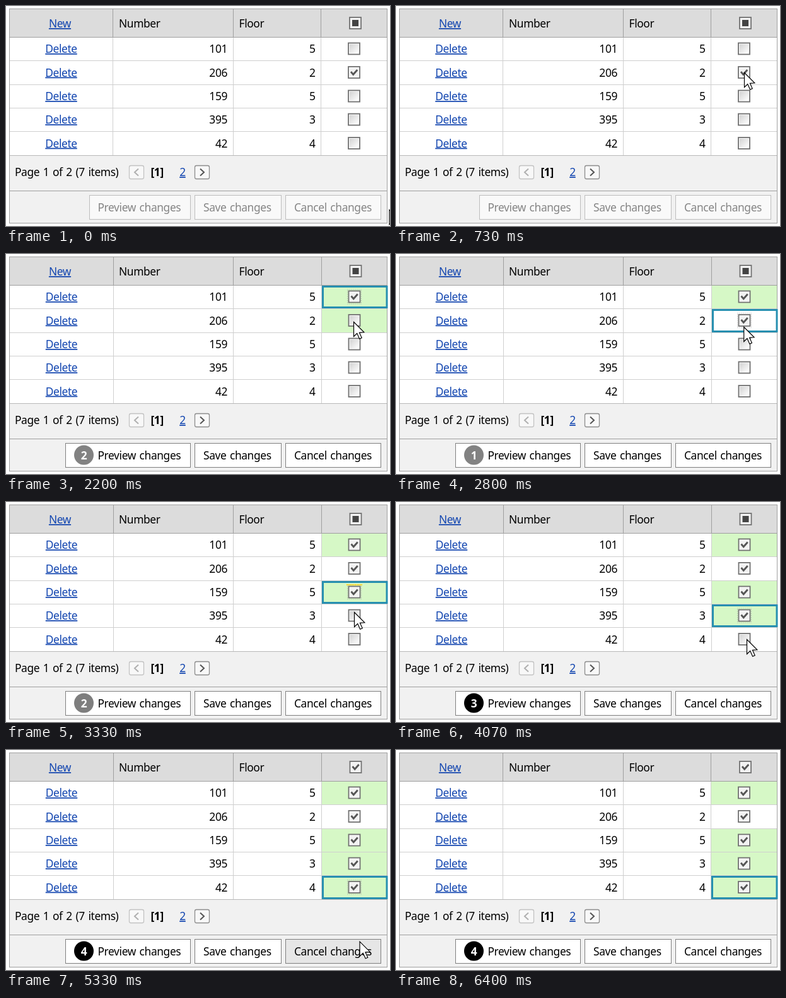
An HTML page that plays this animation: 609 px wide and 348 px high, repeating every 6.47 s.

```html
<!DOCTYPE html>
<html lang="en">
<head>
<meta charset="utf-8">
<title>Batch edit grid</title>
<style>
  html, body { margin: 0; width: 100%; height: 100%; overflow: hidden; background: #fff; }
  svg { display: block; }
  text {
    font: 17.4px "Noto Sans", "Open Sans", sans-serif;
    letter-spacing: -.4px;
    word-spacing: 1.5px;
    white-space: pre;
  }
  .bold { font-weight: 700; }
  .link { fill: #1346b0; text-decoration: underline; text-decoration-thickness: 1px; }
</style>
</head>
<body>
<svg id="stage" width="609" height="348" viewBox="0 0 609 348">
  <defs>
    <linearGradient id="shade" x2="1" y2="1">
      <stop stop-color="#d2d2d2"/>
      <stop offset="1" stop-color="#fff"/>
    </linearGradient>
  </defs>
  <g id="view"></g>
</svg>
<script>
const LOOP = 6470;
const rows = [[101, 5, 0], [206, 2, 1], [159, 5, 0], [395, 3, 0], [42, 4, 0]];
const edges = [50, 87, 125, 162, 199, 237];
const centers = [67.5, 105, 142.5, 179.5, 217];

// time, row toggled, time the badge starts to fade in
const clicks = [
  [1000, 1, 1190], [1870, 0, 2070], [2470, 1, 2670],
  [3000, 2, 3195], [3600, 3, 3795], [4270, 4, 4465]
];
const FADE = 270;

// time, x, y of the pointer tip
const path = [
  [0, 607.5, 322], [670, 552, 106], [730, 552, 105], [1260, 552, 105], [1465, 552, 67],
  [1930, 552, 67], [2130, 551, 107], [2740, 551, 107], [2940, 552, 143],
  [3130, 552, 143], [3300, 552, 174], [3660, 552, 174], [3780, 553, 195],
  [4060, 556, 217], [5070, 556, 217], [5390, 561, 311]
];

const clamp = v => Math.max(0, Math.min(1, v));
const smooth = p => p * p * (3 - 2 * p);
const rect = (x, y, w, h, fill, more = '') =>
  `<rect x="${x}" y="${y}" width="${w}" height="${h}" fill="${fill}" ${more}/>`;
const line = (d, color, width = 1, more = '') =>
  `<path d="${d}" fill="none" stroke="${color}" stroke-width="${width}" ${more}/>`;
const text = (x, y, s, anchor = 'start', more = '') =>
  `<text x="${x}" y="${y}" text-anchor="${anchor}" ${more}>${s}</text>`;
const link = (x, y, s) => text(x, y, s, 'middle', 'class="link"');

function checkbox(x, y, mark) {
  const marks = {
    all: line(`M${x - 5} ${y - 1}l3.7 4.3l6.5 -7.3`, '#555', 2.8),
    some: rect(x - 5, y - 5, 10, 10, '#444')
  };
  return rect(x - 9, y - 9, 18, 18, '#fff', 'stroke="#707070" stroke-width="1.8"') +
    rect(x - 7, y - 7, 14, 14, mark ? '#f2f2f2' : 'url(#shade)') + (marks[mark] || '');
}

function button(x, right, label, textX, active, hover) {
  return rect(x + .5, 299.5, right - x, 38, hover ? '#e6e6e6' : active ? '#fff' : '#f9f9f9',
      `stroke="${active ? '#7f7f7f' : '#bdbdbd'}"`) +
    text(textX, 325, label, 'start', `fill="${active ? '#000' : '#858585'}"`);
}

function pageButton(x, dir, edge, color) {
  return rect(x + .5, 252.5, 23, 21, '#f8f8f8', `rx="2.5" stroke="${edge}" stroke-width="1.3"`) +
    line(`M${x + 12 - dir * 3} 257.5l${dir * 6} 5.5l${-dir * 6} 5.5`, color, 2);
}

function pointer(t) {
  if (t >= 5395) return '';
  const i = Math.max(1, path.findIndex(k => k[0] > t));
  const [a, b] = [path[i - 1], path[i]];
  const p = smooth(clamp((t - a[0]) / (b[0] - a[0])));
  const x = a[1] + (b[1] - a[1]) * p, y = a[2] + (b[2] - a[2]) * p;
  return `<path transform="translate(${x} ${y})" fill="#fff" stroke="#000" stroke-width="1.2"
    d="M.5 .5V23.5L5.7 18.6L9.6 27.2L13.2 25.6L9.4 17.3L16.8 16.8Z"/>`;
}

function ring(t, y) {
  const full = t >= 1000 && t < 1870 || t >= 3000 && t < 3265 || t >= 4335 && t < 4730;
  const top = t >= 3265 && t < 3400;
  if (full) return rect(541, y - 11.5, 23, 23, 'none',
    'stroke="#ffd21c" stroke-width="2" stroke-dasharray="2 .6"');
  return rect(541.5, y - 11.5, 22, 23, 'none', 'stroke="#aaa" stroke-dasharray="1 2"') +
    (top ? line(`M540 ${y - 11.5}h25`, '#ffd21c', 2, 'stroke-dasharray="2 .6"') : '');
}

function render(t) {
  const done = clicks.filter(c => c[0] <= t);
  const last = done[done.length - 1];
  const checked = rows.map(r => r[2]);
  done.forEach(c => checked[c[1]] ^= 1);
  const changed = checked.map((c, i) => c !== rows[i][2]);
  const total = checked.filter(Boolean).length;
  const count = changed.filter(Boolean).length;

  // The columns settle one pixel to the right after each click.
  const shift = last && t - last[0] >= 62 && t < 6395 ? 1 : 0;
  const c1 = 169.5 + shift, c3 = 499.5 + shift, boxX = 552 + shift / 2;

  let out = rect(5, 4, 600, 340, '#fff') + rect(5, 4, 600, 46, '#dcdcdc') +
    rect(5, 237, 600, 107, '#f1f1f1');

  rows.forEach(([number, floor], i) => {
    const top = edges[i], y = centers[i] + 6.5;
    if (changed[i]) out += rect(c3 + .5, top, 104.5 - shift, edges[i + 1] - top, '#d6f8c6');
    out += line(`M5 ${edges[i + 1] - .5}H604`, i < 4 ? '#cfcfcf' : '#b8b8b8') +
      link(87.5 + shift / 2, y, 'Delete') +
      text(351, y, number, 'end') + text(490.5, y, floor, 'end');
  });

  out += line(`M${c1} 50V236M360.5 50V236M${c3} 50V236`, '#cfcfcf') +
    line(`M${c1} 4V50M360.5 4V50M${c3} 4V50M5 49.5H604M5 292.5H604`, '#9f9f9f') +
    rect(5.5, 4.5, 599, 339, 'none', 'stroke="#9f9f9f"') +
    link(85.5, 34, 'New') + text(179, 34, 'Number') + text(369.5, 34, 'Floor') +
    checkbox(554 + shift / 2, 27, total === 5 ? 'all' : total ? 'some' : '');

  if (last) {
    const i = last[1];
    out += rect(c3 + 2, edges[i] + 1.5, 102.5 - shift, edges[i + 1] - edges[i] - 4, 'none',
      'stroke="#268fb0" stroke-width="3"');
    if (t < 6395) out += ring(t, centers[i]);
  }
  checked.forEach((c, i) => out += checkbox(boxX, centers[i], c ? 'all' : ''));

  out += text(14, 269, 'Page 1 of 2 (7 items)') +
    pageButton(195, -1, '#c2c2c2', '#b0b0b0') + text(229.5, 269, '[1]', 'start', 'class="bold"') +
    link(280, 269, '2') + pageButton(299, 1, '#8c8c8c', '#555');

  out += button(last ? 94 : 132, 292, 'Preview changes', 145.5, last) +
    button(299, 436, 'Save changes', 313, last) +
    button(443, 594, 'Cancel changes', 457, last, t >= 5330 && t < 5395);

  if (last) {
    out += `<g opacity="${clamp((t - last[2]) / FADE)}">
      <circle cx="123.5" cy="318" r="15.5"/>
      ${text(123.5, 324.5, count, 'middle', 'class="bold" fill="#fff"')}</g>`;
  }
  return out + pointer(t);
}

const view = document.getElementById('view');
const start = performance.now();
let shown = '';
function tick() {
  const next = render((performance.now() - start) % LOOP);
  if (next !== shown) view.innerHTML = shown = next;
  requestAnimationFrame(tick);
}
tick();
</script>
</body>
</html>
```
